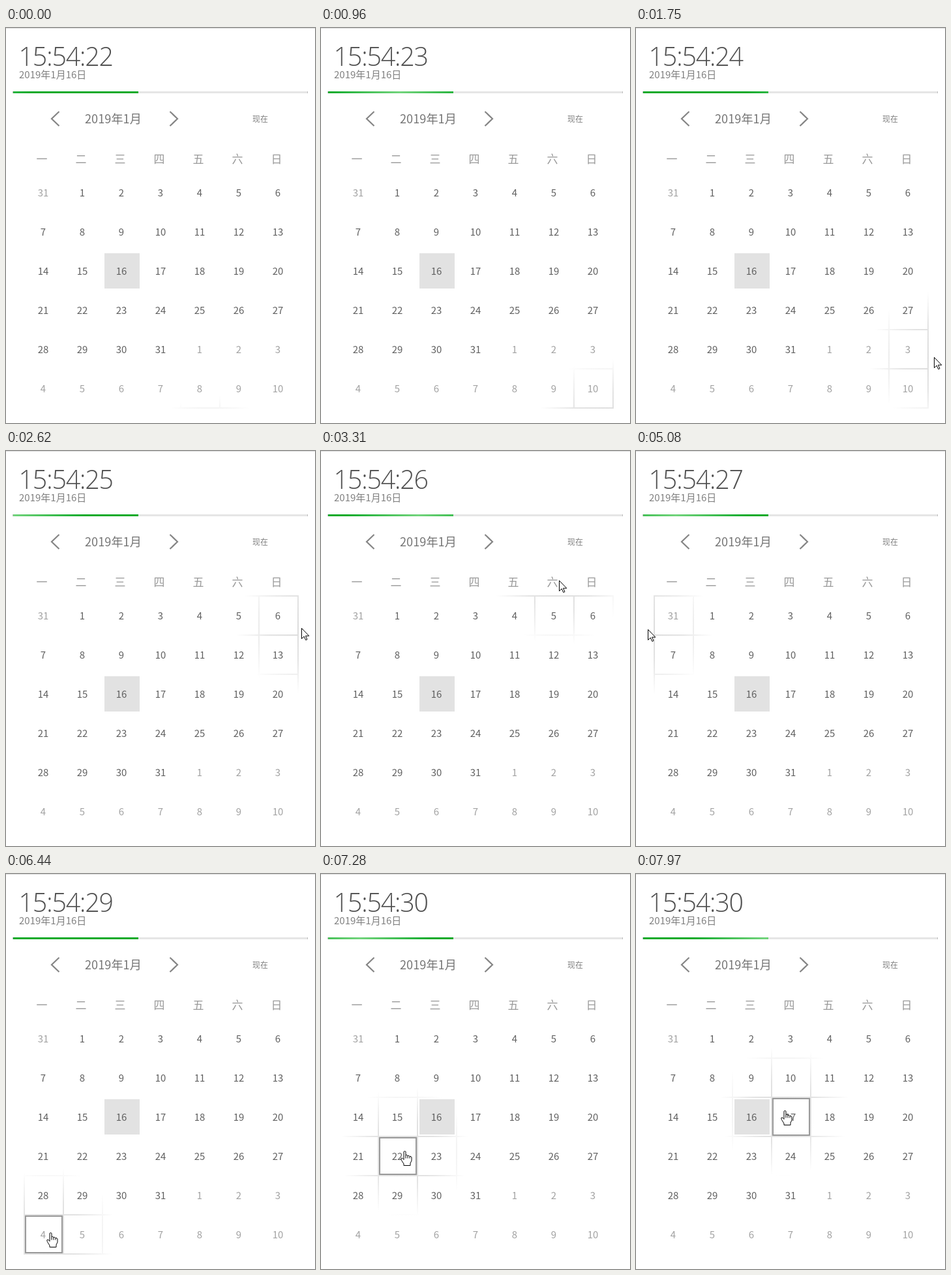
Animation, 474 px wide and 605 px high, one loop 8000 ms. Source, as an HTML page:

```html
<!DOCTYPE html>
<html lang="zh">
<head>
<meta charset="utf-8">
<title>Calendar</title>
<style>
  html, body { margin: 0; width: 100%; height: 100%; overflow: hidden; background: #fff; }
  svg { display: block; }
  text { font-family: "Noto Sans CJK SC", "Noto Sans CJK", "Noto Sans", sans-serif; fill: #808080; }
  #clock { font: 300 39.5px "Open Sans", "Noto Sans", sans-serif; letter-spacing: -1.2px; fill: #505050; }
  #date { font-size: 15px; }
  #month { font-size: 18.2px; fill: #757575; }
  #now { font-size: 12px; }
  .week { font-size: 17px; fill: #999; text-anchor: middle; }
  .day { font-size: 15px; fill: #606060; text-anchor: middle; }
  .other { fill: #a2a2a2; }
  .chevron { fill: none; stroke: #858585; stroke-width: 2.2; }
  .pointer { fill: #fff; stroke: #000; stroke-linejoin: round; }
</style>
</head>
<body>
<svg width="474" height="605" viewBox="0 0 474 605">
  <defs>
    <radialGradient id="light" gradientUnits="userSpaceOnUse" r="100">
      <stop offset="0" stop-color="#dcdcdc"/>
      <stop offset=".5" stop-color="#dcdcdc" stop-opacity=".8"/>
      <stop offset="1" stop-color="#dcdcdc" stop-opacity="0"/>
    </radialGradient>
    <linearGradient id="shine">
      <stop offset="0" stop-color="#b4f0b4" stop-opacity="0"/>
      <stop offset=".5" stop-color="#b4f0b4" stop-opacity=".6"/>
      <stop offset="1" stop-color="#b4f0b4" stop-opacity="0"/>
    </linearGradient>
  </defs>
  <rect width="474" height="605" fill="#fff"/>
  <rect width="474" height="1" fill="#dedede"/>

  <text id="clock" x="19.5" y="58">15:54:22</text>
  <text id="date" x="20" y="77">2019年1月16日</text>

  <rect x="10" y="97" width="453" height="3" fill="#bcbcbc"/>
  <rect x="11" y="97" width="451" height="3" fill="#e6e6e6"/>
  <svg x="11" y="97" width="192" height="3">
    <rect width="192" height="3" fill="#10aa2a"/>
    <rect id="glow" width="220" height="3" fill="url(#shine)"/>
  </svg>

  <path class="chevron" d="M81.500 128L70 139L81.500 150M251.500 128L263 139L251.500 150"/>
  <text id="month" x="121" y="146">2019年1月</text>
  <text id="now" x="378" y="144">现在</text>

  <rect x="151" y="345" width="54" height="54" fill="#e2e2e2"/>
  <path id="grid" fill="none" stroke="url(#light)" stroke-width="2"/>
  <g id="days"></g>
  <rect id="hover" width="56" height="56" fill="none" stroke="#999" stroke-width="2"/>

  <path id="arrow" class="pointer" d="M.5 .5V16.500L4.200 13L6.800 18.600L9 17.600L6.500 12.200H11.800Z"/>
  <path id="hand" class="pointer" d="M-1.500 13V1.500Q-1.500 0 0 0T1.500 1.500V6Q3 5 4.500 7Q6.500 6 7.500 8Q10 7.500 10.500 9.500V14.500L8.500 18.500V22H-1.500V19.500L-5 14Q-6.500 11-5 10.500Q-3.500 10-1.500 13ZM1.500 6V11M4.500 7V11M7.500 8V11"/>
</svg>
<script>
const LOOP = 8000, LEFT = 28, TOP = 222, CELL = 60, COLS = 7, ROWS = 6;
const $ = id => document.getElementById(id);

// key points of the pointer tip: time, x, y
const path = [
  [220, 313, 662], [1150, 461, 585], [1750, 457, 504], [2620, 453, 271],
  [2950, 440, 218], [3510, 313, 193], [4060, 132, 193], [4600, 32, 210],
  [5080, 18, 273], [6030, 25, 474], [6440, 68, 550], [7200, 118, 435],
  [7970, 228, 363]
];

function addText(x, y, str, cls) {
  const el = document.createElementNS("http://www.w3.org/2000/svg", "text");
  el.setAttribute("x", x);
  el.setAttribute("y", y);
  el.setAttribute("class", cls);
  el.textContent = str;
  $("days").append(el);
}

function build() {
  [..."一二三四五六日"].forEach((ch, i) => addText(55 + CELL * i, 207, ch, "week"));
  for (let i = 0; i < COLS * ROWS; i++) {
    const inMonth = i > 0 && i < 32;
    addText(57 + CELL * (i % COLS), 258 + CELL * Math.floor(i / COLS),
      (i + 30) % 31 + 1, inMonth ? "day" : "day other");
  }
  let d = "";
  for (let c = 0; c <= COLS; c++) d += `M${LEFT + CELL * c} ${TOP - 1}v${CELL * ROWS + 2}`;
  for (let r = 0; r <= ROWS; r++) d += `M${LEFT - 1} ${TOP + CELL * r}h${CELL * COLS + 2}`;
  $("grid").setAttribute("d", d);
}

// slope of coordinate k at point i
function slope(i, k) {
  const a = path[i - 1], b = path[i + 1];
  return a && b ? (b[k] - a[k]) / (b[0] - a[0]) : 0;
}

// smooth curve through the key points
function pointerAt(t) {
  const last = path.length - 1;
  t = Math.min(Math.max(t, path[0][0]), path[last][0]);
  let i = 0;
  while (t > path[i + 1][0]) i++;
  const a = path[i], b = path[i + 1], h = b[0] - a[0], u = (t - a[0]) / h;
  const w = u * u * (3 - 2 * u);
  return [1, 2].map(k => a[k] + (b[k] - a[k]) * w
    + h * u * (1 - u) * ((1 - u) * slope(i, k) - u * slope(i + 1, k)));
}

function place(el, x, y) {
  el.setAttribute("transform", `translate(${x} ${y})`);
}

function show(el, on) {
  el.style.display = on ? "" : "none";
}

function draw(t) {
  if (t < 220) t = 0;
  const [x, y] = pointerAt(t);
  const col = Math.floor((x - LEFT) / CELL), row = Math.floor((y - TOP) / CELL);
  const over = col >= 0 && col < COLS && row >= 0 && row < ROWS;

  $("clock").textContent = "15:54:" + (22 + Math.floor((t + 870) / 1000));
  $("light").setAttribute("cx", x);
  $("light").setAttribute("cy", y);

  show($("hover"), over);
  show($("hand"), over);
  show($("arrow"), !over);
  place($("hover"), LEFT + CELL * col + 2, TOP + CELL * row + 2);
  place($("hand"), Math.round(x) + .5, Math.round(y) - .5);
  place($("arrow"), Math.round(x), Math.round(y));

  // glow sweeps at 200 px/s, then starts over
  place($("glow"), (t + 2350) % 2210 / 5 - 220, 0);
}

function tick(now) {
  draw(now % LOOP);
  requestAnimationFrame(tick);
}

build();
draw(0);
requestAnimationFrame(tick);
</script>
</body>
</html>
```
